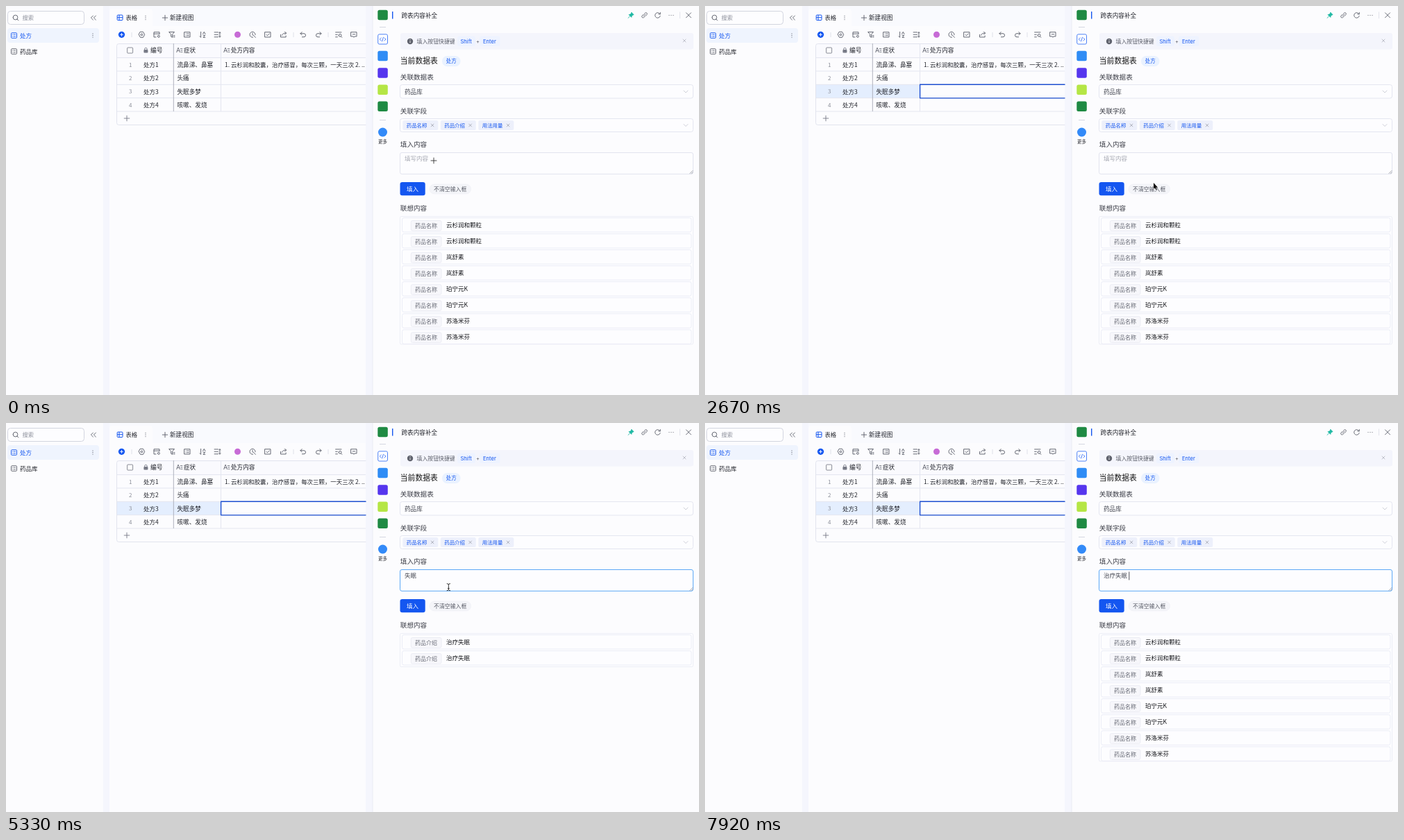
These frames come from a looping animation (998x561 px, 8 s). An HTML page:

```html
<!DOCTYPE html>
<html lang="zh-CN">
<head>
<meta charset="utf-8">
<title>跨表内容补全</title>
<style>
html, body { margin: 0; width: 100%; height: 100%; overflow: hidden; background: #fcfcfe; }
svg { display: block; width: 998px; height: 561px; }
text { font-family: "Noto Sans CJK SC", "Noto Sans CJK", Inter, sans-serif; white-space: pre; }
</style>
</head>
<body>
<svg viewBox="0 0 998 561"><g id="base"></g><g id="live"></g></svg>
<script>
const BLUE = '#1456f0', INK = '#23252c', GREY = '#5a5d68', LINE = '#e4e6f0';

// Drawing helpers; text is placed by its vertical centre.
const text = (x, cy, s, size = 8.5, fill = INK, weight = 400, more = '') =>
  `<text x="${x}" y="${cy + size * .37}" font-size="${size}" fill="${fill}" font-weight="${weight}" ${more}>${s}</text>`;
const latin = 'style="font-family:Inter,sans-serif"';
const rect = (x, y, x2, y2, fill, stroke = 'none', r = 0, w = 1) =>
  `<rect x="${x}" y="${y}" width="${x2 - x}" height="${y2 - y}" rx="${r}" fill="${fill}" stroke="${stroke}" stroke-width="${w}"/>`;
const path = (x, y, d, stroke = GREY, w = .9, fill = 'none') =>
  `<path transform="translate(${x} ${y})" d="${d}" stroke="${stroke}" stroke-width="${w}" fill="${fill}" stroke-linecap="round" stroke-linejoin="round"/>`;
const line = (x, y, x2, y2, stroke = LINE, w = 1) =>
  `<path d="M${x} ${y}L${x2} ${y2}" stroke="${stroke}" stroke-width="${w}"/>`;
const dot = (x, y, r, fill) => `<circle cx="${x}" cy="${y}" r="${r}" fill="${fill}"/>`;
const plus = (x, y, r = 3.7, c = GREY, w = .9) => path(x, y, `M${-r} 0H${r}M0 ${-r}V${r}`, c, w);
const cross = (x, y, r, c = '#9497a3', w = .7) => path(x, y, `M${-r} ${-r}L${r} ${r}M${r} ${-r}L${-r} ${r}`, c, w);
const dots = (x, y, dx, dy, c = '#777a86') => [-1, 0, 1].map(i => dot(x + i * dx, y + i * dy, .65, c)).join('');
const checkbox = (x, y) => rect(x - 4, y - 4, x + 4, y + 4, '#fdfdff', '#6d707c', 1, .8);
const chevron = (x, y) => path(x, y, 'M-3 -1.5L0 1.5L3 -1.5', '#b9bbc7', .7);
const listIcon = (x, y, c) => rect(x - 4, y - 3.8, x + 4, y + 3.8, 'none', c, 1, .9) +
  path(x, y, 'M-2.2 -1.4H-1.8M-.4 -1.4H2.2M-2.2 1.4H-1.8M-.4 1.4H2.2', c, .8);

const rowTop = i => 74.6 + 19.35 * i;
const rowMid = i => rowTop(i) + 10.2;
const symptoms = ['流鼻涕、鼻塞', '头痛', '失眠多梦', '咳嗽、发烧'];
const drugs = ['云杉润和颗粒', '岚舒素', '珀宁元K', '苏洛米芬'];
const gear = 'M-2 -4H2L4.2 0L2 4H-2L-4.2 0ZM-1.4 0A1.4 1.4 0 1 0 1.4 0A1.4 1.4 0 1 0 -1.4 0';
const box = 'M-4 -3.6H4V3.6H-4Z';
const tools = [
  [195.5, gear],
  [217, 'M4 -1V-3.6H-4V3.6H-1M-4 -1.2H4M1.4 2.4A1.5 1.5 0 1 0 4.4 2.4A1.5 1.5 0 1 0 1.4 2.4'],
  [239, 'M-4 -3.8H3.5L.5 -.2V4L-1.4 2.8V-.2ZM2 1.4H4M2 3.4H4'],
  [261, box + 'M-2 -1.3H-1.8M-.2 -1.3H2.2M-2 1.3H-1.8M-.2 1.3H2.2'],
  [283, 'M-2.4 -4V4L-4 2.4M.6 -.8L2.3 -4L4 -.8M1 1H3.8L1 4H3.8'],
  [304.5, 'M-4.4 -3.4H1M-4.4 0H1M-4.4 3.4H1M3.4 -3.6V3.6M2.2 -2.4L3.4 -3.6L4.6 -2.4M2.2 2.4L3.4 3.6L4.6 2.4'],
  [355, 'M4 .4A4 4 0 1 0 .6 3.9M0 -2.2V.3L1.6 1.2M2.4 2L4.4 4'],
  [377, box + 'M-2 0L-.5 1.5L2.2 -1.4'],
  [399.5, 'M-4 0V3.6H3.6V1.6M-2 1C-1.6 -1.2 .2 -2.2 4 -2.2M2 -4.2L4 -2.2L2 -.2'],
  [428, 'M-1.8 -3.8L-4 -1.6L-1.8 .6M-4 -1.6H1A2.4 2.4 0 0 1 1 3.4H-1.6'],
  [450, 'M1.8 -3.8L4 -1.6L1.8 .6M4 -1.6H-1A2.4 2.4 0 0 0 -1 3.4H1.6'],
  [479, 'M-4.4 -3.4H4M-4.4 0H-1.6M-4.4 3.4H-1.6M.2 1A1.9 1.9 0 1 0 4 1A1.9 1.9 0 1 0 .2 1M3.5 2.6L4.8 4'],
  [501, 'M-4 -3.6H4V2.6H1L0 3.8L-1 2.6H-4ZM-1.8 -.5H1.8'],
];
const fieldIcon = x => text(x, 64, 'A', 9, GREY, 400, latin) + path(x + 6.3, 64, 'M0 -2.4H2.6M.4 0H2.6M.8 2.4H2.6', GREY, .8);

function sidebar() {
  return rect(140, 0, 149, 561, '#f5f6fd') + rect(518, 0, 528, 561, '#f5f6fd') +
    rect(149, 0, 518, 30, '#f9fafe') + rect(149, 4, 211, 36, '#fcfcfe', 'none', 4) + rect(149, 29, 518, 54, '#fcfcfe') +
    line(528, 0, 528, 561, '#e9ebf3') +
    rect(2.5, 7.5, 112.5, 26.5, '#fdfdff', '#d3d5df', 4) +
    path(13.5, 16.5, 'M-3.4 0A3.4 3.4 0 1 0 3.4 0A3.4 3.4 0 1 0 -3.4 0M2.5 2.5L4.4 4.4') +
    text(23.5, 17, '搜索', 8.3, '#8d909b') +
    path(126, 17, 'M-.6 -3L-3.6 0L-.6 3M3.4 -3L.4 0L3.4 3') +
    rect(2, 32, 134, 53, '#eff4fe', 'none', 4) + listIcon(11.5, 42.5, BLUE) +
    text(20, 42.5, '处方', 8.5, BLUE) + dots(125, 42.5, 0, 2.6) +
    listIcon(11.5, 65.5, GREY) + text(20, 65.5, '药品库');
}

function table() {
  let s = rect(160.2, 13, 168, 20.5, 'none', BLUE, 1, 1) + line(163, 13, 163, 20.5, BLUE) + line(160, 16.7, 168, 16.7, BLUE) +
    text(172.5, 17, '表格', 8.4, INK, 500) + dots(201, 17, 0, 2.6) +
    plus(229, 17) + text(236, 17, '新建视图', 8.6, INK, 500) +
    dot(166.5, 41.3, 4.6, BLUE) + plus(166.5, 41.3, 2, '#fff') + dot(333.5, 41.3, 4.5, '#c76bd6');
  for (const x of [181, 414, 464]) s += line(x, 38, x, 45, '#d9dbe5', .8);
  for (const [x, d] of tools) s += path(x, 41.3, d, '#555865');
  s += rect(160, 54, 518, 75, '#fafafe') + checkbox(178.6, 64) +
    rect(198.4, 63, 204.4, 67.6, '#777a86', 'none', 1) + path(201.4, 63, 'M-1.7 0V-1A1.7 1.7 0 0 1 1.7 -1V0', '#777a86') +
    text(208, 64, '编号', 8.8, INK, 500) + fieldIcon(245) + text(256, 64, '症状', 8.6, INK, 500) +
    fieldIcon(313) + text(324, 64, '处方内容', 8.6, INK, 500);
  return s + path(0, 0, 'M518 54.5H162.5Q159.5 54.5 159.5 57.5V168.5Q159.5 171.5 162.5 171.5H518', '#dfe1ec', .9) +
    plus(174, 162, 3.8, '#777a86') + line(309.5, 54, 309.5, 75);
}

function panel() {
  let s = '';
  for (const [y, c] of [[13, '#1f8a43'], [72, '#2f8cf5'], [96.5, '#5636ee'], [120.7, '#b5e645'], [144.8, '#1f8a43']])
    s += rect(535.3, y - 7.2, 549.8, y + 7.2, c, 'none', 2.5);
  s += rect(535.7, 40.8, 549.5, 55, '#fdfdff', '#3a74f5', 2, .9) +
    path(542.6, 48, 'M-2.3 -2L-4.4 0L-2.3 2M2.3 -2L4.4 0L2.3 2M.8 -2.8L-.8 2.8', '#3a74f5') +
    line(538, 30.5, 547, 30.5, '#d5d7e1') + line(538, 164.5, 547, 164.5, '#d5d7e1') +
    dot(542.5, 182, 6.5, '#338af8') + text(536, 195.5, '更多', 6.5) +
    line(556.7, 8, 556.7, 18.5, BLUE, 1.4) + text(569.5, 13.5, '跨表内容补全', 8.6, INK, 500) +
    path(900, 13.3, 'M.8 -4L4 -.8L2.6 -.3L1.2 1.2L.8 3L-3 -.8L-1.2 -1.2L.3 -2.6ZM-1.4 1.4L-4 4', '#20b9a4', .9, '#20b9a4') +
    path(919.5, 13.3, 'M-.6 -1.6L1 -3.2A1.7 1.7 0 0 1 3.4 -.8L1.6 1M.6 1.6L-1 3.2A1.7 1.7 0 0 1 -3.4 .8L-1.6 -1M-1.3 1.3L1.3 -1.3') +
    path(938.5, 13.3, 'M3.4 -1.6A3.8 3.8 0 1 0 3.7 1M3.8 -4V-1.5H1.3') + dots(958, 13.3, 3, 0) +
    line(970.5, 8.5, 970.5, 18, '#dcdee7', .8) + cross(983, 13.3, 3.5, GREY, .9) +
    rect(568, 39, 990, 62.5, '#f4f5fc', 'none', 3) + dot(582, 51, 4.2, '#60636e') +
    line(582, 50.5, 582, 53, '#fff', .9) + dot(582, 48.7, .6, '#fff') + text(591.5, 51, '填入按钮快捷键', 7.9, GREY) +
    rect(650, 43.5, 676, 58, '#eef3ff', 'none', 3) + text(654.5, 51, 'Shift', 7.6, BLUE, 400, latin) +
    text(677, 51, '+', 7.5, GREY, 400, latin) +
    rect(682, 43.5, 711.5, 58, '#eef3ff', 'none', 3) + text(687, 51, 'Enter', 7.6, BLUE, 400, latin) + cross(977, 50, 2, '#a8aab5') +
    text(567.8, 79.5, '当前数据表', 10.8, '#111', 500) +
    rect(628, 72, 654.5, 87.3, '#eaf2ff', 'none', 7.5) + text(633.8, 79.5, '处方', 7.5, BLUE);
  [['关联数据表', 102.5], ['关联字段', 151], ['填入内容', 199.3], ['联想内容', 291.2]]
    .forEach(([t, y]) => s += text(567.8, y, t, 9.6, '#3d3f48'));
  s += rect(567.5, 113.5, 989.5, 133, '#fdfdff', LINE, 3) + text(574, 123.5, '药品库', 8.6, '#444751') + chevron(979, 123.5) +
    rect(567.5, 162.5, 989.5, 181.5, '#fdfdff', LINE, 3) + chevron(979, 172);
  ['药品名称', '药品介绍', '用法用量'].forEach((t, i) => {
    const x = 571.3 + i * 54.5;
    s += rect(x, 165, x + 51, 179, '#edf0fb', 'none', 2.5) + text(x + 5.5, 172, t, 7.4, BLUE, 500) + cross(x + 42.8, 172, 1.9);
  });
  return s + rect(567.5, 254, 603.7, 273.3, BLUE, 'none', 3) + text(577, 263.8, '填入', 8.5, '#fff', 500) +
    rect(610, 257, 669.5, 271, '#f4f5f9', '#eff0f5', 7, .7) + text(616, 264, '不清空输入框', 7.9, GREY);
}

// All times below are in ticks of 1/12 s.
const COUNT = 96, TICK = 1000 / 12;
const moves = [
  [0, 616, 223], [2, 616, 223], [3, 621, 228.5], [17, 621, 228.5], [18, 436, 146], [19, 398.5, 128],
  [20, 394, 123], [27, 392, 122], [28, 436, 146], [30, 574, 224], [32, 646, 255], [33, 646, 258], [36, 632, 230],
  [37, 630.5, 228], [62, 630.5, 228], [63, 632, 229], [66, 648, 252], [70, 682, 314], [71, 683.5, 322],
  [74, 683.5, 322], [79, 709.5, 224], [COUNT, 709.5, 224],
];
const caretOn = [[9, 14], [20, 22], [37, 43], [49, 63], [69, 71], [73, 79], [84, 90], [95, COUNT]];
const focusSpans = [[9, 22], [35, 71], [73, 120]];
const within = (k, a, b) => k >= a && k < b;
const mix = (a, b, p) => a + (b - a) * p;

function pointer(k) {
  const i = Math.max(1, moves.findIndex(m => m[0] >= k));
  const [a, x, y] = moves[i - 1], [b, x2, y2] = moves[i], p = (k - a) / (b - a);
  return [mix(x, x2, p), mix(y, y2, p)];
}

// Border fades take 0.3 s, starting with a visible first step.
function focus(k) {
  let v = 0;
  for (const [a, b] of focusSpans) {
    if (k >= a) v = Math.max(v, Math.min(1, (k - a + 1) / 4));
    if (k >= b) v *= Math.max(0, 1 - (k - b + 1) / 4);
  }
  return v;
}

function rows(k) {
  const hover = within(k, 18, 20) || k === 28 ? 3 : within(k, 20, 28) ? 2 : -1;
  const picked = k >= 22;
  let s = '';
  symptoms.forEach((t, i) => {
    const y = rowMid(i), top = rowTop(i);
    if (i === hover) s += rect(160, top, 518, top + 19.3, '#f2f3fb');
    if (i === 2 && picked) s += rect(160, top, 309, top + 19.3, '#e4eefe');
    if (i === hover) {
      for (let n = 0; n < 6; n++) s += dot(165 + n % 2 * 2.6, y - 2.8 + (n >> 1) * 2.8, .75, '#777a86');
      s += checkbox(178.6, y) + path(198.5, y, 'M.8 -.8L3 -3M.9 -3H3V-.9M-.8 .8L-3 3M-.9 3H-3V.9') +
        text(204, y, '详情', 8, GREY) + plus(231.8, y, 3.4);
    } else {
      s += text(179.3, y, i + 1, 8, '#8b8e99', 400, 'text-anchor="middle"') + text(198, y, '处方' + (i + 1));
    }
    s += text(246.5, y, t, 8.6) + line(160, top, 518, top);
  });
  s += text(315, rowMid(0), `1. ${drugs[0].slice(0, 4)}胶囊，治疗感冒，每次三颗，一天三次 2. ..`, 8.45) +
    line(160, rowTop(4), 518, rowTop(4)) + line(309.5, 75, 309.5, 152) + line(241.3, 54, 241.3, 152, '#a9abb7', .9);
  if (picked) s += path(0, 0, `M518 ${rowTop(2)}H309.6V${rowTop(3) + .2}H518`, '#1d4fd0', 1.4);
  return s;
}

function popup(k) {
  const right = k < 52 ? 745 : 792;
  const words = k < 52 ? ['是', '上', '说', '时', '事'] : ['失眠', '市面', '石棉', '失', '时'];
  const step = (right - 576) / 5;
  let s = rect(571, 233, right + 2, 260, '#0000000f', 'none', 5) + rect(572, 231.5, right, 256, '#f8f8fb', '#d5d6dd', 4, .7) +
    rect(574.5, 234, 573 + step, 253.5, '#2f6fe8', 'none', 3);
  words.forEach((w, i) => {
    const x = 578 + i * step, c = i ? INK : '#fff';
    s += text(x, 244, i + 1, 6, i ? '#8b8e99' : '#fff') + text(x + 6, 244, w, 9.5, c);
  });
  return s;
}

function input(k) {
  const f = focus(k);
  const channel = [[226, 92], [228, 168], [239, 246]].map(([a, b]) => Math.round(mix(a, b, f)));
  const draft = k < 49 ? '' : k < 52 ? 's' : k < 53 ? 'shi mi' : k < 56 ? 'shi mian' : k < 74 ? '失眠' : '治疗失眠';
  const typing = within(k, 49, 56);
  const end = typing ? 574 + draft.length * 4.5 : k >= 95 ? 610.8 : 574.5 + draft.length * 8.4;
  let s = rect(567.5, 211.5, 989.5, 242.3, '#fdfdff', `rgb(${channel})`, 2.5) +
    path(0, 0, 'M985 241.5L989 237.5M987.5 241.5L989 240', '#777a86', .7) +
    text(574, 220.3, draft || '填写内容', 8.5, draft ? '#444751' : '#a6a8b2');
  if (typing) s += line(574, 226, end - 1, 226, GREY, .7);
  if (caretOn.some(([a, b]) => within(k, a, b))) s += line(end, 214.5, end, 226.5, INK, .8);
  return s;
}

function suggestions(k) {
  const short = within(k, 56, 74), n = short ? 2 : 8;
  let s = rect(567.5, 303.5, 989.5, 305.5 + n * 23.05 - (short ? 0 : 2), '#fdfdff', '#eceef6', 2);
  for (let i = 0; i < n; i++) {
    const y = 316 + i * 23.05, hot = i === 0 && within(k, 70, 75) && short;
    s += rect(570.5, y - 10.5, 987, y + 10, hot ? '#eff2fc' : '#fdfdff', '#e9ebf5', 2.5, .9) +
      rect(583.3, y - 6.5, 627, y + 8, '#f7f7fb', '#e7e9f1', 2, .8) +
      text(589, y + .9, short ? '药品介绍' : '药品名称', 8, '#666974') +
      text(634, y, short ? '治疗失眠' : drugs[i >> 1], 8.5, hot ? BLUE : '#15161a', hot ? 700 : 400);
  }
  return s;
}

function cursor(k) {
  if (within(k, 49, 63) || k >= 95) return '';
  const [x, y] = pointer(k);
  if (k < 3) return plus(x, y, 4, '#333', .9);
  if (within(k, 70, 77))
    return path(x, y, 'M-1 .8Q0 -.8 1 .8V4L4.6 5V8L3.6 11H-.6L-2.6 7.5Q-3 5.8 -1 6.6Z', '#222', .9, '#fff');
  if (x > 568 && within(y, 211, 243))
    return path(x, y, 'M-2.2 -5Q0 -5 0 -3.6Q0 -5 2.2 -5M0 -3.6V3.6M-2.2 5Q0 5 0 3.6Q0 5 2.2 5M-1 1.8H1', '#222', .9);
  const arrow = 'M0 0V9L2 7.2L3.4 10.2L4.8 9.6L3.5 6.7H6.2Z';
  return path(x, y, arrow, '#fff', 1) + path(x, y, arrow, 'none', 0, '#111');
}

const live = document.getElementById('live');
document.getElementById('base').innerHTML = sidebar() + table() + panel();
let shown = -1;
function draw() {
  // The small lead matches step times rounded to 10 ms.
  const k = Math.floor((performance.now() + 4) / TICK) % COUNT;
  if (k !== shown) {
    shown = k;
    live.innerHTML = rows(k) + input(k) + suggestions(k) + (within(k, 49, 56) ? popup(k) : '') + cursor(k);
  }
  requestAnimationFrame(draw);
}
draw();
</script>
</body>
</html>
```
